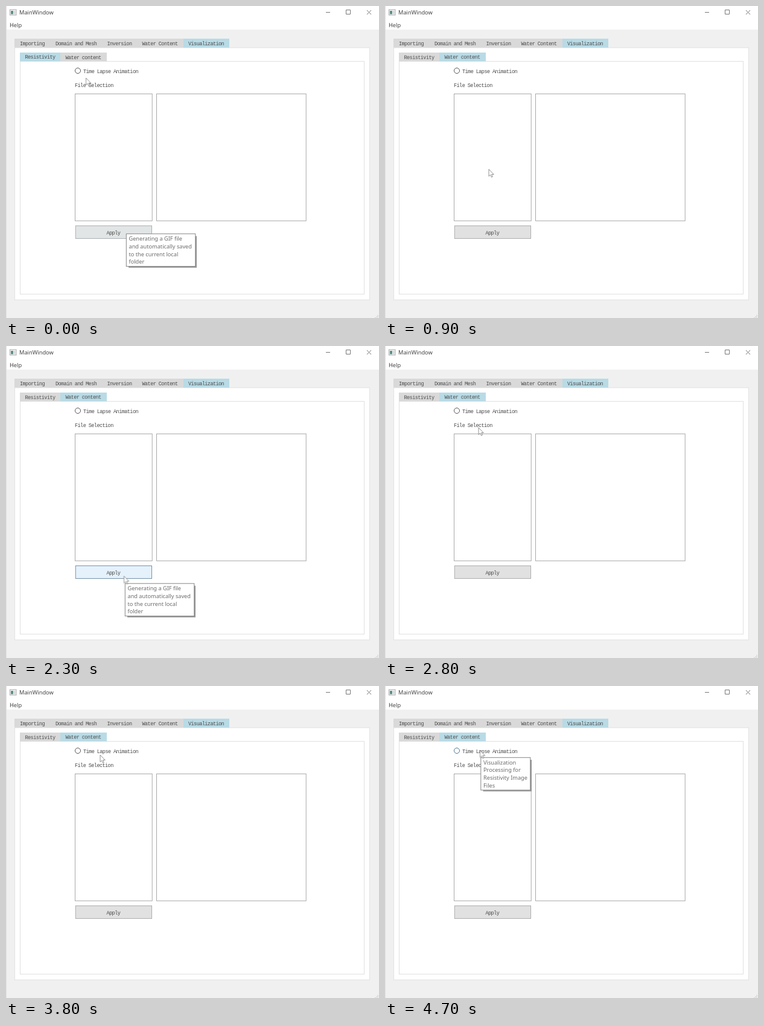
Recreate the animation shown at these times as an HTML page. Size 618x516 px, loop 5100 ms.

```html
<!DOCTYPE html>
<html lang="en">
<head>
<meta charset="utf-8">
<title>MainWindow</title>
<style>
html, body { margin: 0; width: 100%; height: 100%; overflow: hidden; background: #f0f0f0; }
svg { display: block; }
text { white-space: pre; }
.ui { font: 9.25px "Noto Sans", sans-serif; fill: #444; }
.mono { font: 8.5px "Liberation Mono", monospace; letter-spacing: -.55px; fill: #4a4a4a; }
.tab { fill: #d9d9d9; }
.on { fill: #b8dbe6; }
.box { fill: #fff; stroke: #a8a8a8; }
.tip { font: 9.2px "Noto Sans", sans-serif; fill: #6c6c6c; }
.tip .shade { fill: #979797; }
.tip .face { fill: #fff; stroke: #858585; }
.icon { fill: none; stroke: #777; }

.loop { animation: 5100ms step-end infinite; }
#cursor { animation-name: cursor; }
#tabA { animation-name: tabA; }
#tabB { animation-name: tabB; }
#labelA { animation-name: labelA; }
#labelB { animation-name: labelB; }
#button { animation-name: button; }
#radio { animation-name: radio; }
#tip0 { animation-name: tip0; }
#tip1 { animation-name: tip1; }
#tip2 { animation-name: tip2; }
#tip3 { animation-name: tip3; }

@keyframes cursor {
  0% { transform: translate(132.5px, 119px); }
  1.96% { transform: translate(134px, 101px); }
  3.92% { transform: translate(136px, 85px); }
  5.88%, 7.84% { transform: translate(137px, 79.5px); }
  13.72% { transform: translate(139px, 96px); }
  15.68% { transform: translate(150px, 160px); }
  17.64% { transform: translate(172px, 270px); }
  19.6% { transform: translate(190px, 356px); }
  21.56% { transform: translate(195.5px, 380.5px); }
  49.01% { transform: translate(191px, 340px); }
  50.98% { transform: translate(178px, 246px); }
  52.94% { transform: translate(163px, 171px); }
  54.9% { transform: translate(155px, 135px); }
  56.86% { transform: translate(153.5px, 127.5px); }
  74.5% { transform: translate(156px, 114px); }
  76.47%, 100% { transform: translate(157.5px, 106.5px); }
}
@keyframes tabA { 0% { fill: #b8dbe6; } 7.84%, 100% { fill: #d9d9d9; } }
@keyframes tabB { 0% { fill: #d9d9d9; } 7.84%, 100% { fill: #b8dbe6; } }
@keyframes labelA { 0% { transform: translateY(-.8px); } 7.84%, 100% { transform: none; } }
@keyframes labelB { 0% { transform: none; } 7.84%, 100% { transform: translateY(-.8px); } }
@keyframes button {
  0% { fill: #e2e5e5; stroke: #abb0b3; }
  1.96% { fill: #e1e1e1; stroke: #adadad; }
  19.6% { fill: #e3e9ee; stroke: #94a3b0; }
  21.56% { fill: #e5f1fb; stroke: #7893aa; }
  49.01% { fill: #e4ebf1; stroke: #8fa0af; }
  50.98% { fill: #e2e6e9; stroke: #a0a8ae; }
  52.94%, 100% { fill: #e1e1e1; stroke: #adadad; }
}
@keyframes radio {
  0% { stroke: #555; }
  78.43% { stroke: #50606c; }
  80.39% { stroke: #4c6b82; }
  84.31%, 100% { stroke: #4a7694; }
}
@keyframes tip0 { 0% { opacity: 1; } 1.96%, 100% { opacity: 0; } }
@keyframes tip1 { 0% { opacity: 0; } 37.25% { opacity: 1; } 49.01%, 100% { opacity: 0; } }
@keyframes tip2 { 0% { opacity: 0; } 58.82% { opacity: 1; } 74.5%, 100% { opacity: 0; } }
@keyframes tip3 { 0% { opacity: 0; } 76.47%, 100% { opacity: 1; } }
</style>
</head>
<body>
<svg width="618" height="516" viewBox="0 0 618 516">
  <rect width="618" height="516" fill="#f0f0f0"/>
  <rect width="618" height="39" fill="#fff"/>
  <path d="M.5 0V516" stroke="#e0e0e0"/>

  <!-- title bar -->
  <rect x="6.5" y="6" width="10.5" height="9" fill="#f4f6f6" stroke="#aaa"/>
  <rect x="8" y="8" width="4" height="5.5" fill="#5a8d88"/>
  <rect x="13" y="8" width="2.5" height="5.5" fill="#d3d7d7"/>
  <text class="ui" x="22" y="14">MainWindow</text>
  <text class="ui" x="6" y="34.6">Help</text>
  <path class="icon" d="M530 10.5h7M563.5 6.5h7v7h-7zM598 7l7 7M605 7l-7 7"/>

  <!-- main tabs -->
  <rect class="tab" x="14" y="54" width="280" height="15"/>
  <rect class="on" x="294" y="54" width="76" height="15"/>
  <rect x="14.5" y="69" width="588" height="417" fill="#fff" stroke="#e2e2e2"/>
  <rect class="on" x="294" y="67" width="76" height="1.5"/>
  <g class="mono">
    <text x="23" y="65.4">Importing</text>
    <text x="82" y="65.4">Domain and Mesh</text>
    <text x="167.5" y="65.4">Inversion</text>
    <text x="225.5" y="65.4">Water Content</text>
    <text x="302" y="64.6">Visualization</text>
  </g>

  <!-- inner tabs -->
  <rect x="23.5" y="91.5" width="570" height="385" fill="#fff" stroke="#e0e0e0"/>
  <rect id="tabA" class="tab loop" x="23" y="77" width="67" height="14.5"/>
  <rect id="tabB" class="tab loop" x="90" y="77" width="77" height="14.5"/>
  <g class="mono">
    <text id="labelA" class="loop" x="31.5" y="88.2">Resistivity</text>
    <text id="labelB" class="loop" x="98.5" y="88.2">Water content</text>
    <text x="128" y="110.5">Time Lapse Animation</text>
    <text x="114" y="133.8">File Selection</text>
  </g>
  <circle id="radio" class="loop" cx="119" cy="107" r="4.5" fill="#fff" stroke="#555"/>

  <rect class="box" x="114.5" y="145.3" width="127.7" height="210"/>
  <rect class="box" x="249.5" y="145.3" width="247.7" height="210"/>
  <rect id="button" class="loop" x="115.3" y="363.5" width="126.2" height="21" fill="#e1e1e1" stroke="#adadad"/>
  <text class="mono" x="166.5" y="377.6">Apply</text>

  <path d="M616 511v5M614 513.5v2.5M612 515v1" stroke="#bcbcbc" stroke-dasharray="1.5 1"/>

  <g id="tips"></g>
  <path id="cursor" class="loop" d="M0 0V11.6L2.7 9.2L4.4 13.2L6.3 12.4L4.6 8.5H8.2Z"
    fill="#fff" stroke="#777" stroke-width=".8"/>
</svg>
<script>
const save = ["Generating a GIF file", "and automatically saved", "to the current local", "folder"];
const tips = [
  { x: 199, y: 376.5, w: 114.5, lines: save },
  { x: 197, y: 392.5, w: 114.5, lines: save },
  { x: 155, y: 140.5, w: 91, lines: ["After selecting one", "or more files, click", "Apply"] },
  { x: 158.5, y: 118, w: 82, lines: ["Visualization", "Processing for", "Resistivity Image", "Files"] }
];

function tipMarkup({ x, y, w, lines }, i) {
  const h = lines.length * 12.7 + 3;
  const text = lines.map((line, n) =>
    `<text x="${x + 4.5}" y="${y + 11.6 + n * 12.7}">${line}</text>`).join("");
  return `<g id="tip${i}" class="tip loop">
    <rect class="shade" x="${x + 4}" y="${y + 4}" width="${w - 1.5}" height="${h - 1.5}"/>
    <rect class="face" x="${x + .3}" y="${y + .3}" width="${w}" height="${h}"/>${text}</g>`;
}
document.getElementById("tips").innerHTML = tips.map(tipMarkup).join("");
</script>
</body>
</html>
```
